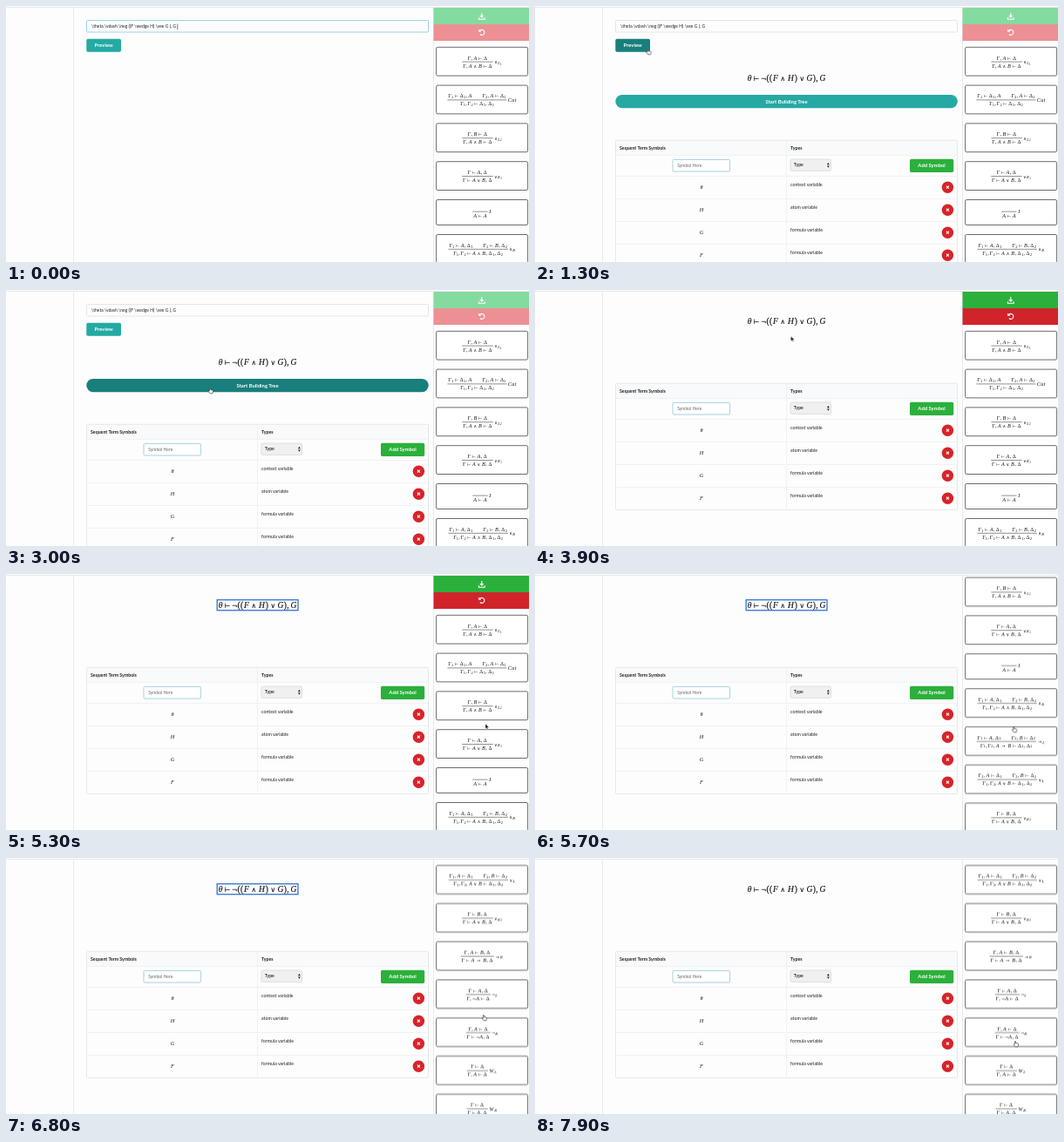
Recreate the animation shown at these times as an HTML page. Size 600 by 294 pixels, loop 8000 ms.

```html
<!DOCTYPE html>
<html lang="en">
<head>
<meta charset="utf-8">
<title>Sequent tree builder</title>
<style>
html, body { margin: 0; width: 100%; height: 100%; overflow: hidden; background: #fdfdfe; }
svg { display: block; width: 600px; height: 294px; }
text { font: 5.25px Lato, sans-serif; fill: #222; white-space: pre; }
.bold { font-weight: 700; }
.btn { font-size: 5.9px; font-weight: 700; fill: #fff; text-anchor: middle; }
.math { font-family: "Liberation Serif", serif; text-anchor: middle; fill: #111; }
.it { font-style: italic; }
.op { font-family: "DejaVu Sans", sans-serif; }
.line { fill: none; stroke: #e3e4e5; stroke-width: .8; }
.row { fill: none; stroke: #ebecec; stroke-width: .7; }
.icon { fill: none; stroke: #fff; stroke-width: 1.1; }
.card { fill: #fff; stroke: #5c5c5c; stroke-width: .9; }

/* Hard switches */
.form, .start, .work, .preview, .startBar, .field, .caret, .ring, .green, .red, .cursor, .hand, .arrow {
  animation: 8s step-end infinite;
}
.form { animation-name: form; }
.start { animation-name: start; }
.work { animation-name: work; }
.preview { animation-name: preview; }
.startBar { animation-name: startBar; }
.field { animation-name: field; }
.caret { animation-name: caret; }
.ring { animation-name: ring; }
.green { animation-name: green; }
.red { animation-name: red; }
.hand { animation-name: hand; }
.arrow { animation-name: arrow; }
.cursor { animation-name: shown; }
@keyframes form { 0% { opacity: 1 } 40%, to { opacity: 0 } }
@keyframes start { 0% { opacity: 0 } 5% { opacity: 1 } 40%, to { opacity: 0 } }
@keyframes work {
  0% { opacity: 0; transform: translateY(47px) }
  5% { opacity: 1; transform: translateY(47px) }
  40%, to { opacity: 1; transform: translateY(0) }
}
@keyframes preview { 0% { fill: #25a9a3 } 1.25% { fill: #187f7c } 23.75%, to { fill: #25a9a3 } }
@keyframes startBar { 0% { fill: #25a9a3 } 32.5%, to { fill: #187f7c } }
@keyframes field { 0% { stroke: #85c4e4 } 5%, to { stroke: #dedfe0 } }
@keyframes caret { 0% { opacity: 1 } 1.25%, to { opacity: 0 } }
@keyframes ring { 0% { opacity: 0 } 56.25% { opacity: 1 } 92.5%, to { opacity: 0 } }
@keyframes green { 0% { fill: #84dba0 } 40%, to { fill: #2bb03b } }
@keyframes red { 0% { fill: #ec9094 } 40%, to { fill: #d0232a } }
@keyframes shown { 0% { opacity: 0 } 1.25%, to { opacity: 1 } }
@keyframes hand {
  0% { opacity: 1 } 23.75% { opacity: 0 } 32.5% { opacity: 1 } 40% { opacity: 0 }
  53.75% { opacity: 1 } 58.75% { opacity: 0 } 67.5%, to { opacity: 1 }
}
@keyframes arrow {
  0% { opacity: 0 } 23.75% { opacity: 1 } 32.5% { opacity: 0 } 40% { opacity: 1 }
  53.75% { opacity: 0 } 58.75% { opacity: 1 } 67.5%, to { opacity: 0 }
}

/* Continuous motion */
.move { animation: move 8s ease-in-out infinite; }
.scroll { animation: scroll 8s ease-in-out infinite; }
@keyframes move {
  0%, 21.25% { transform: translate(129.5px, 49px) }
  35%, 43.75% { transform: translate(234px, 112px) }
  48.75% { transform: translate(293.5px, 53px) }
  53.75%, 57.5% { transform: translate(291px, 37px) }
  65%, 67.5% { transform: translate(550px, 172px) }
  76.25%, 87.5% { transform: translate(548px, 180px) }
  92.5%, to { transform: translate(551px, 210px) }
}
@keyframes scroll {
  0%, 66.25% { transform: translateY(0) }
  77%, 78% { transform: translateY(-295.8px) }
  80%, 82.5% { transform: translateY(-320px) }
  85%, to { transform: translateY(-341.6px) }
}
</style>
</head>
<body>
<svg viewBox="0 0 600 294">
  <defs><clipPath id="pane"><rect x="490" y="2" width="110" height="292"/></clipPath></defs>
  <path class="line" d="M0 1.5H600M77.5 2V294M490.5 2V294"/>

  <g class="form">
    <rect class="line field" x="92.5" y="16.5" width="392" height="13.5" rx="1.2"/>
    <text x="98" y="25.4" style="font-size:5px">\theta \vdash \neg ((F \wedge H) \vee G ), G</text>
    <path class="caret" d="M196.8 20.5V27" stroke="#222" stroke-width=".6"/>
    <rect class="preview" x="92.3" y="37.8" width="39.7" height="15" rx="1.7"/>
    <text class="btn" x="112.2" y="47.4">Preview</text>
  </g>
  <g class="start">
    <rect class="startBar" x="92.3" y="102" width="392.5" height="15.2" rx="7.6"/>
    <text class="btn" x="288.6" y="111.7">Start Building Tree</text>
  </g>

  <g class="work" id="work">
    <rect class="ring" x="242.2" y="29.7" width="92.8" height="12" fill="none" stroke="#3f7bd6" stroke-width="1.4"/>
    <rect x="92.5" y="107.3" width="392" height="17" fill="#f9fafb"/>
    <rect class="line" x="92.5" y="107.3" width="392" height="145.2" rx="1.2"/>
    <path class="row" d="M92.5 124.4H484.5M92.5 148.4H484.5M92.5 174.4H484.5M92.5 200.4H484.5M92.5 226.4H484.5M288.5 107.3V252.5"/>
    <text class="bold" x="97" y="117.6">Sequent Term Symbols</text>
    <text class="bold" x="293" y="117.6">Types</text>
    <rect x="158" y="129.4" width="65.6" height="13.6" rx="1.2" fill="#fff" stroke="#8fc6dc" stroke-width=".8"/>
    <text x="163.2" y="138" style="font-size:5px;fill:#666">Symbol Here</text>
    <rect x="293" y="129" width="46.5" height="13.4" rx="1.6" fill="#f0f0f0" stroke="#d6d6d6" stroke-width=".7"/>
    <text x="296.8" y="137.4" style="fill:#000">Type</text>
    <path d="M335 135.2L336.4 132.8L337.8 135.2ZM335 136.4L336.4 138.8L337.8 136.4Z" fill="#222"/>
    <rect x="430" y="128.7" width="50.2" height="15.2" rx="1.7" fill="#2bb03b"/>
    <text class="btn" x="455.1" y="138.4">Add Symbol</text>
  </g>

  <g clip-path="url(#pane)">
    <g class="scroll" id="rules">
      <rect class="green" x="490.5" y="2" width="110" height="19"/>
      <rect class="red" x="490.5" y="21" width="110" height="19"/>
      <path class="icon" d="M545.8 8V12.5M542.4 13.2V15.2H549.2V13.2"/>
      <path d="M543.2 11H548.4L545.8 13.9Z" fill="#fff"/>
      <path class="icon" d="M543.3 28.8A3 3 0 1 1 543.8 32.5"/>
      <path d="M542.2 26.6V29.8H545.4Z" fill="#fff"/>
    </g>
  </g>

  <g class="cursor"><g class="move">
    <path class="arrow" d="M0 0V5.8L1.3 4.6L2.2 6.5L3.1 6.1L2.3 4.2H4.1Z" fill="#111" stroke="#fff" stroke-width=".4"/>
    <path class="hand" d="M-.6 .7Q0-.4 .6 .7V2.5L3 3Q3.7 3.4 3.5 4.6L2.9 6.8H.1L-1.9 4.3Q-1.8 3.3-.6 4Z" fill="#fff" stroke="#222" stroke-width=".6"/>
  </g></g>
</svg>
<script>
// Glyph advances in em; operators include their side spacing.
const ADVANCE = {
  'Γ': .625, 'Δ': .833, 'θ': .47, A: .75, B: .78, C: .72, F: .75, G: .786, H: .88, I: .5,
  L: .68, R: .76, W: 1, u: .57, t: .36, ',': .445, '(': .389, ')': .389, ' ': 2,
  '∧': 1.11, '∨': 1.11, '⊢': 1.167, '→': 1.556, '¬': .667
};
const TIGHT = { '∧': .667, '∨': .667, '→': 1 };
const OPS = '∧∨⊢→¬';
const SIZE = 5.92;
const work = document.getElementById('work');
const rules = document.getElementById('rules');

function add(parent, tag, attrs, text = '') {
  const node = document.createElementNS('http://www.w3.org/2000/svg', tag);
  for (const key in attrs) node.setAttribute(key, attrs[key]);
  node.textContent = text;
  parent.append(node);
  return node;
}

// "_x" is a subscript, "'x" a subscript of a subscript.
function layout(src, tight) {
  let x = 0;
  const glyphs = (src.match(/[_'].|./gu) || []).map(token => {
    const ch = token.slice(-1);
    const level = token.length < 2 ? 0 : token[0] === '_' ? 1 : 2;
    const scale = [1, .72, .52][level];
    const width = ((tight && TIGHT[ch]) || ADVANCE[ch] || .5) * scale;
    const mid = x + (ch === ',' ? .14 : width / 2);
    x += width + (level === 1 ? .04 : 0);
    return { ch, scale, mid, drop: [0, .16, .26][level] };
  });
  return { glyphs, width: x };
}

function math(parent, { glyphs }, x, y, size) {
  const text = add(parent, 'text', { class: 'math' });
  for (const { ch, scale, mid, drop } of glyphs) {
    if (ch === ' ') continue;
    const op = OPS.includes(ch);
    add(text, 'tspan', {
      class: op ? 'op' : /[A-Za-zθ]/.test(ch) ? 'it' : '',
      x: x + mid * size,
      y: y + drop * size,
      'font-size': size * scale * (op ? .83 : 1.04)
    }, ch);
  }
  return text;
}

function centred(parent, src, cx, y, size) {
  const row = layout(src);
  return math(parent, row, cx - row.width * size / 2, y, size);
}

const goal = centred(work, 'θ⊢¬((F∧H)∨G),G', 288.8, 39, 9.2);
goal.setAttribute('stroke', '#111');
goal.setAttribute('stroke-width', '.15');

const symbols = [['θ', 'context'], ['H', 'atom'], ['G', 'formula'], ['F', 'formula']];
symbols.forEach(([letter, kind], i) => {
  const y = 161.2 + 26 * i;
  centred(work, letter, 191, y + 2, SIZE);
  add(work, 'text', { x: 293, y: y - 1.4 }, kind + ' variable');
  add(work, 'circle', { cx: 473.4, cy: y, r: 6.7, fill: '#d8232a' });
  add(work, 'path', { class: 'icon', d: `M471.9 ${y - 1.5}l3 3m0-3l-3 3` });
});

// Premises, conclusion, rule name.
const cards = [
  ['Γ,A⊢Δ', 'Γ,A∧B⊢Δ', "∧_L'1"],
  ['Γ_1⊢Δ_1,A Γ_2,A⊢Δ_2', 'Γ_1,Γ_2⊢Δ_1,Δ_2', 'Cut'],
  ['Γ,B⊢Δ', 'Γ,A∧B⊢Δ', "∧_L'2"],
  ['Γ⊢A,Δ', 'Γ⊢A∨B,Δ', "∨_R'1"],
  ['', 'A⊢A', 'I'],
  ['Γ_1⊢A,Δ_1 Γ_2⊢B,Δ_2', 'Γ_1,Γ_2⊢A∧B,Δ_1,Δ_2', '∧_R'],
  ['Γ_1⊢A,Δ_1 Γ_2,B⊢Δ_2', 'Γ_1,Γ_2,A→B⊢Δ_1,Δ_2', '→_L'],
  ['Γ_1,A⊢Δ_1 Γ_2,B⊢Δ_2', 'Γ_1,Γ_2,A∨B⊢Δ_1,Δ_2', '∨_L'],
  ['Γ⊢B,Δ', 'Γ⊢A∨B,Δ', "∨_R'2"],
  ['Γ,A⊢B,Δ', 'Γ⊢A→B,Δ', '→_R'],
  ['Γ⊢A,Δ', 'Γ,¬A⊢Δ', '¬_L'],
  ['Γ,A⊢Δ', 'Γ⊢¬A,Δ', '¬_R'],
  ['Γ⊢Δ', 'Γ,A⊢Δ', 'W_L'],
  ['Γ⊢Δ', 'Γ⊢A,Δ', 'W_R']
];
let cardY = 47.3;
for (const [above, below, rule] of cards) {
  const height = above ? 32.8 : 29;
  const bar = cardY + (above ? 16.8 : 13.6);
  const label = layout(rule, true);
  const width = Math.max(layout(above).width, layout(below).width) * SIZE + 1.6;
  const left = 546 - (width + 1.2 + label.width * SIZE) / 2;
  const cx = left + width / 2;
  add(rules, 'rect', { class: 'card', x: 493.6, y: cardY, width: 105, height, rx: 1.6 });
  centred(rules, above, cx, bar - 2.6, SIZE);
  centred(rules, below, cx, bar + 6.4, SIZE);
  add(rules, 'path', { d: `M${left} ${bar}h${width}`, stroke: '#222', 'stroke-width': .5 });
  math(rules, label, left + width + 1.2, bar + 2, SIZE);
  cardY += height + 11;
}
</script>
</body>
</html>
```
